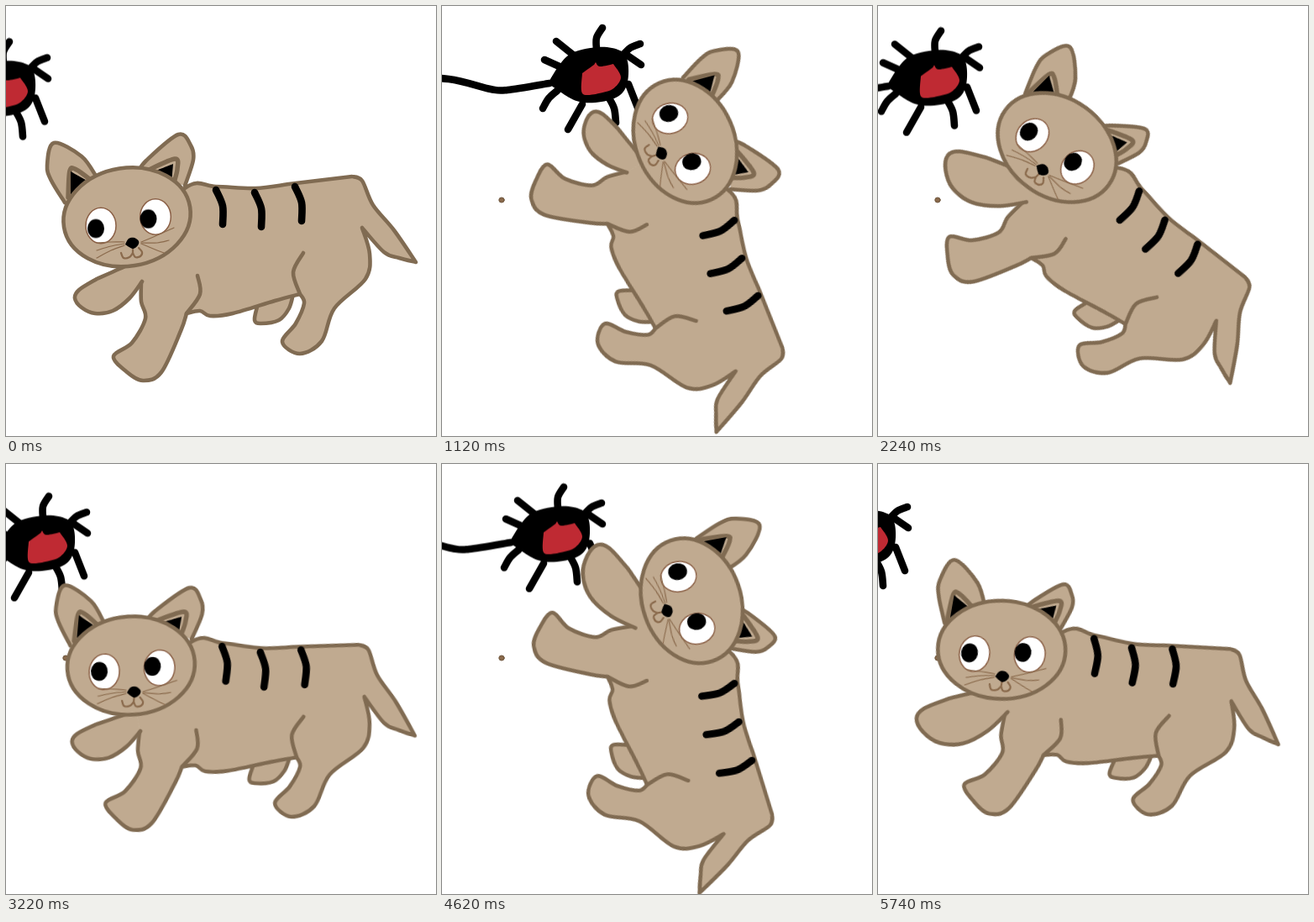
Write an HTML page that moves like this. It is 512 by 512 pixels and loops after 5.88 s.

```html
<!DOCTYPE html>
<html lang="en">
<head>
<meta charset="utf-8">
<title>Kitten and toy bug</title>
<style>
  html, body { margin: 0; width: 100%; height: 100%; overflow: hidden; background: #fff; }
  svg { display: block; width: 100vw; height: 100vh; }
  path, ellipse { stroke-linecap: round; stroke-linejoin: round; fill: none; }
  .fur { fill: #c0aa90; stroke: #806b52; stroke-width: 4.6; vector-effect: non-scaling-stroke; }
  .line { stroke: #806b52; stroke-width: 4.6; }
  .inner { stroke: #806b52; stroke-width: 5.5; }
  .ink { fill: #000; }
  .stripe, .leg { stroke: #000; stroke-width: 8.6; }
  .eye { fill: #fff; stroke: #8a5f45; stroke-width: 1.5; }
  .thin { stroke: #8a6a4c; stroke-width: 1.2; }
  .mouth { stroke: #8a6a4c; stroke-width: 2.2; }
  .red { fill: #bf2a33; }
</style>
</head>
<body>
<svg viewBox="0 0 512 512">
  <ellipse cx="71" cy="231" rx="3.2" ry="3" style="fill:#8a6a4c;stroke:#6e563d"/>
  <g id="toy"></g>
  <g id="cat">
    <g id="body"></g>
    <g id="arm"></g>
    <g id="earL"></g>
    <g id="earR"></g>
    <g id="ears"></g>
    <g id="head">
      <ellipse class="fur" cx="144" cy="251.3" rx="76" ry="58.5" transform="rotate(-9 144 251)"/>
      <ellipse class="eye" cx="113" cy="261.5" rx="18" ry="21.3"/>
      <ellipse class="eye" cx="178" cy="251" rx="18.3" ry="21.3"/>
      <g id="pupils">
        <ellipse class="ink" cx="107" cy="261.5" rx="10" ry="11.3"/>
        <ellipse class="ink" cx="169.5" cy="250" rx="10" ry="11.3"/>
      </g>
    </g>
  </g>
</svg>
<script>
const $ = id => document.getElementById(id);
const STEP = 140, COUNT = 21;

// Smooth path through points; "|" marks a sharp corner, whose point is given once.
function curve(text) {
  let d = '', last = null;
  for (const part of text.split('|')) {
    const n = part.trim().split(/[\s,]+/).map(Number);
    const p = last ? [last] : [];
    for (let i = 0; i < n.length; i += 2) p.push([n[i], n[i + 1]]);
    if (!last) d = 'M' + p[0];
    for (let i = 0; i < p.length - 1; i++) {
      const a = p[i - 1] || p[i], b = p[i], c = p[i + 1], e = p[i + 2] || c;
      const h = k => b[k] + (c[k] - a[k]) / 6, g = k => c[k] - (e[k] - b[k]) / 6;
      d += `C${h(0)},${h(1)} ${g(0)},${g(1)} ${c}`;
    }
    last = p[p.length - 1];
  }
  return d;
}

function draw(id, cls, ...shapes) {
  for (const s of shapes) {
    const el = document.createElementNS('http://www.w3.org/2000/svg', 'path');
    el.setAttribute('class', cls);
    el.setAttribute('d', curve(s));
    $(id).append(el);
  }
}

// Toy bug on a string
draw('toy', 'leg',
  '-60,84 8,87 58,99 78,100 128,92',
  '142,73 122,64', '156,58 136,42', '184,52 184,38 191,26',
  '214,60 224,50 236,45', '218,57 237,70', '222,93 233,121',
  '198,108 205,122 207,139', '167,117 150,147', '137,101 127,110 120,122');
draw('toy', 'ink', '126,92 150,59 185,49 212,53 221,66 221,90 212,106 190,114 160,113 126,92');
draw('toy', 'red', '167,80 181,70 | 183,67 | 188,72 204,69 | 213,85 203,99 183,105 | 167,104 167,80');

// Body, legs and tail
draw('body', 'fur',
  '342,343 337,360 325,374 303,378 296,374 299,358',
  `150,290 | 213,217 250,215 297,217 345,211 412,203 | 424,208 437,237 462,267 488,305 |
   468,300 450,293 424,264 |
   433,295 428,325 391,360 376,399 350,414 329,400 345,378 355,354 350,343 |
   320,351 270,366 243,369 231,363 215,366 |
   208,387 185,436 163,446 143,435 128,417 150,401 166,372 161,352 161,328`);
draw('body', 'line', '354,294 342,317 350,343', '228,321 231,343 215,366');
for (const [x, y] of [[250, 219], [296, 222], [344, 215]])
  draw('body', 'stripe', `${x},${y} ${x + 8},${y + 19} ${x + 8},${y + 41}`);

draw('arm', 'fur', '155,303 135,313 108,325 | 87,338 82,348 90,359 106,366 127,363 147,348 162,328');

draw('earL', 'fur', '70,234 54,208 49,190 57,163 90,179 108,204');
draw('earR', 'fur', '158,197 167,184 205,153 220,166 223,183 213,214');
draw('ears', 'inner', '74,228 76,196 84,195 102,208', '168,196 201,182 204,194 200,210');
draw('ears', 'ink', '77,197 | 100,210 | 77,226 | 77,197', '171,199 | 199,188 | 197,212 | 171,199');

// Face
for (let k = 0; k < 3; k++)
  draw('head', 'thin',
    `141,${281 + 2 * k} 125,${281 + 5 * k} 108,${282 + 9 * k}`,
    `161,${281 + k} 180,${273 + 9 * k} ${200 - 6 * k},${264 + 15 * k}`);
draw('head', 'mouth', '137,294 140,300 147,299 151,294 | 154,299 160,298 162,293 158,288', '151,287 151,294');
draw('head', 'ink', '142,284 146,277 153,276 158,280 157,285 151,289 142,284');

// Motion: the cat rears up after the toy, then drops back with its arm stretched out
const falling = s => s >= 10;

function tilt(s) {
  const rise = s < 6 ? 1.25 * s * s : 15 * s - 45;
  const fall = 8.7 * (21.15 - s);
  return Math.min(rise, fall, 88);
}

const toyStops = [[0, -187], [2, -140], [6, -28], [8, 0], [12, -46], [16, -116], [20, -201]];

function toyX(s) {
  const i = Math.max(1, toyStops.findIndex(k => k[0] >= s));
  const [a, b] = [toyStops[i - 1], toyStops[i]];
  return a[1] + (b[1] - a[1]) * (s - a[0]) / (b[0] - a[0]);
}

function play(id, transformAt) {
  const frames = [];
  for (let s = 0; s <= COUNT; s++)
    frames.push({ offset: s / COUNT, easing: 'step-end', transform: transformAt(s % COUNT) });
  $(id).animate(frames, { duration: STEP * COUNT, iterations: Infinity });
}

const about = (x, y, act, toX = x, toY = y) =>
  `translate(${toX}px,${toY}px) ${act} translate(${-x}px,${-y}px)`;

play('cat', s => {
  const turn = `rotate(${tilt(s)}deg)`;
  return falling(s) ? about(273, 308.5, turn, 264.3, 300) : about(275.5, 301, turn);
});
play('toy', s => {
  const x = toyX(s);
  return `translate(${x}px,${x * (falling(s) ? -0.03 : -0.088)}px)`;
});
play('arm', s => falling(s) ? about(162, 328, 'scale(1.32)', 164, 323) : 'none');
play('earL', s => falling(s) ? about(70, 233, 'rotate(9deg) scale(1.06)', 72, 231) : 'none');
play('earR', s => falling(s) ? about(190, 208, 'scale(.84)') : 'none');
play('pupils', s => `translate(0px,${s < 1 ? 3.5 : 0}px)`);
</script>
</body>
</html>
```
